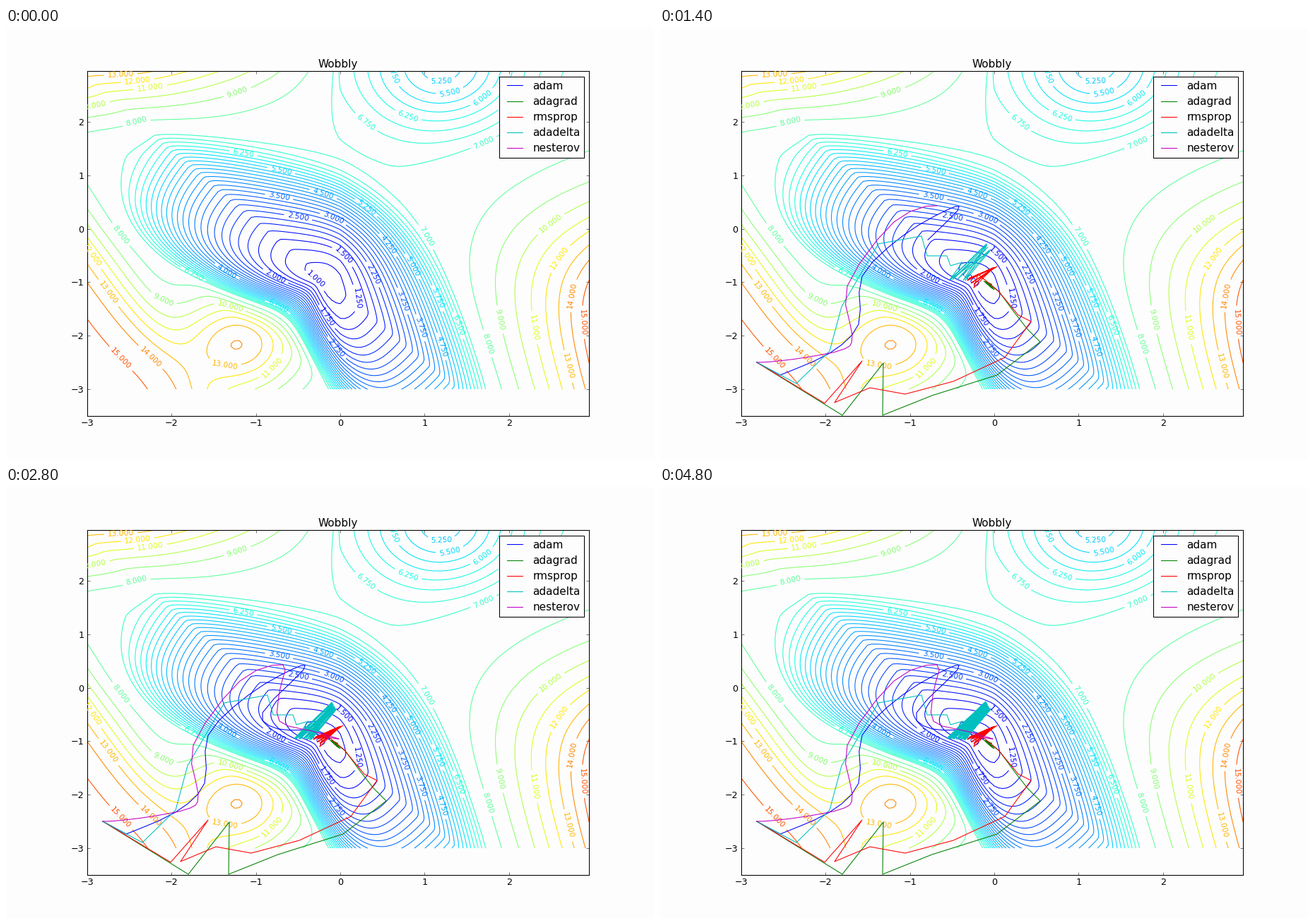
Animation, 917 px wide and 611 px high, one loop 5 s. Source, as a matplotlib script:

```python
import numpy as np
import matplotlib.pyplot as plt
from matplotlib.animation import FuncAnimation
from matplotlib.patches import Rectangle

W, H, DPI = 917, 611, 76.4
LEFT, RIGHT, TOP, BOTTOM = W * 0.125, W * 0.9, H * 0.1, H * 0.9
UNIT_X = (RIGHT - LEFT) / 5.95
UNIT_Y = (BOTTOM - TOP) / 6.45
X0, Y0 = LEFT + 3 * UNIT_X, TOP + 2.95 * UNIT_Y
FRAMES, INTERVAL, STEPS_PER_FRAME = 25, 200, 3
STEPS = FRAMES * STEPS_PER_FRAME
PAPER = "#fdfdfd"

plt.rcParams.update({"font.family": "DejaVu Sans", "font.size": 12})


def ramp(v):
    return np.maximum(v, 0)


def bell(x, y, cx, cy, sx, sy):
    return np.exp(-(x - cx) ** 2 / sx - (y - cy) ** 2 / sy)


def basin(x, y):
    """Tilted bowl, gentle to the upper right and steep to the lower left."""
    dx, dy = (x + 0.21) * UNIT_X, (y + 0.89) * UNIT_Y
    angle = np.arctan2(dy, dx)
    gentle = ramp(np.cos(angle - np.radians(50))) ** 1.2
    steep = ramp(np.cos(angle - np.radians(229))) ** 4.8
    stiffness = (1.1 + 4.1 * gentle + 15.3 * steep) * 1e-5
    crease = 0.35 * abs(x) * np.exp(-x * x)
    return 0.8 + 6.15 * (stiffness * (dx * dx + dy * dy)) ** 0.92 + crease


def highland(x, y):
    """Plateau with rising sides, a hill and a second hollow."""
    lower_left = 4.15 * (1 + np.tanh(-2.2 * x - y - 6.8))
    upper_left = ramp(-x) * ramp(y - 1.3) ** 2
    right = 3.5 / (1 + np.exp(1.55 * (y + 0.35))) * ramp(x - 0.8 + 0.2 * y) ** 1.7
    hill = 6.8 * bell(x, y, -1.2, -2.15, 0.5, 0.8)
    hollow = 2 * bell(x, y, 1.2, 3.05, 0.9, 1.35)
    return 7.1 + lower_left + upper_left + right + hill - hollow


def wobbly(x, y, blend=0.6):
    return -blend * np.logaddexp(-basin(x, y) / blend, -highland(x, y) / blend)


def curve(keys):
    """Smooth path through the keys, one key per frame."""
    p = np.array([keys[0], *keys, keys[-1]], float)
    points = []
    for a, b, c, d in zip(p, p[1:], p[2:], p[3:]):
        for t in np.arange(STEPS_PER_FRAME) / STEPS_PER_FRAME:
            points.append(b + 0.5 * t * (c - a + t * (2 * a - 5 * b + 4 * c - d
                                                      + t * (3 * (b - c) + d - a))))
    return points + [p[-1]]


def zigzag(keys, low, low_spread, high, high_spread, decay):
    """Straight steps through the keys, then swings between two loose ends."""
    low, high = np.array(low), np.array(high)
    middle, points = (low + high) / 2, list(keys)
    for t in range(STEPS - len(keys)):
        u = (0.5 + 0.5 * np.cos(2.4 * (t // 2))) * (0.75 + 0.25 * t / STEPS)
        end = high + u * np.array(high_spread) if t % 2 else low + u * np.array(low_spread)
        points.append(middle + (end - middle) * np.exp(-t * decay))
    return points


START = (137, 474)
TRACKS = [
    ("adam", "b", [START] + curve([
        (170, 492), (240, 461), (281, 420), (286, 352), (343, 295), (406, 258),
        (421, 259), (363, 320), (385, 343), (440, 345), (458, 358), (428, 344),
        (448, 350)])),
    ("adagrad", "g", zigzag(
        [START, (258, 549), (316, 475), (315, 549), (385, 521), (477, 492),
         (538, 445), (520, 427), (502, 404), (480, 374)],
        (456, 357), (6, 3), (476, 374), (-8, -14), 0.1)),
    ("rmsprop", "r", zigzag(
        [START, (233, 532), (286, 472), (247, 531), (297, 510), (347, 519),
         (415, 501), (488, 467), (525, 416), (507, 407), (478, 372), (450, 349)],
        (432, 357), (16, 15), (480, 337), (-10, 3), 0.03)),
    ("adadelta", "c", zigzag(
        [START, (193, 504), (240, 458), (257, 395), (309, 306), (370, 295),
         (378, 323), (406, 323), (411, 337), (428, 332)],
        (432, 358), (-29, -2), (467, 316), (-7, -13), 0)),
    ("nesterov", "m", curve([
        START, (158, 473), (206, 467), (261, 455), (272, 435), (265, 366),
        (331, 275), (392, 252), (387, 290), (387, 332), (433, 346), (471, 357),
        (452, 354)])),
]

fig = plt.figure(figsize=((W + 0.01) / DPI, (H + 0.01) / DPI), dpi=DPI, facecolor=PAPER)
ax = fig.add_axes([0.125, 0.1, 0.775, 0.8], facecolor=PAPER)
ax.set(xlim=(-3, 2.95), ylim=(-3.5, 2.95), xticks=range(-3, 3), yticks=range(-3, 3))
ax.tick_params(direction="in", top=True, right=True, length=4, width=0.5, pad=4)
for spine in ax.spines.values():
    spine.set_linewidth(1)
ax.set_title("Wobbly", fontsize=14.4, pad=5)

axis = np.arange(-3, 2.96, 0.05)
grid_x, grid_y = np.meshgrid(axis, axis)
levels = np.r_[np.arange(1, 7.1, 0.25), np.arange(8, 16)]
contours = ax.contour(grid_x, grid_y, wobbly(grid_x, grid_y), levels=levels,
                      cmap="jet", vmin=-1, vmax=18.5, linewidths=1)
ax.clabel(contours, fmt="%1.3f", fontsize=10, inline=True, inline_spacing=5)
ax.set(xlim=(-3, 2.95), ylim=(-3.5, 2.95))

# Overlay in stage pixels for the legend and the paths
stage = fig.add_axes([0, 0, 1, 1], xlim=(0, W), ylim=(H, 0))
stage.axis("off")
window = Rectangle((LEFT, TOP), RIGHT - LEFT, BOTTOM - TOP, transform=stage.transData)
stage.add_patch(Rectangle((698, 69), 120, 115.5, fc=PAPER, ec="k", lw=1, zorder=10))
lines = []
for row, (name, color, _) in enumerate(TRACKS):
    y = 81.5 + 22.1 * row
    stage.plot([708.5, 731], [y, y], color=color, lw=1, zorder=11)
    stage.text(745.5, y + 5, name, fontsize=14.4, va="baseline", zorder=11)
    line, = stage.plot([], [], color=color, lw=1, zorder=5)
    line.set_clip_path(window)
    lines.append(line)


def update(frame):
    shown = STEPS_PER_FRAME * frame + 1
    for line, (_, _, points) in zip(lines, TRACKS):
        line.set_data(*zip(*points[:shown]))
    return lines


anim = FuncAnimation(fig, update, frames=FRAMES, interval=INTERVAL,
                     repeat=True, repeat_delay=0, blit=False)
plt.show()
```
